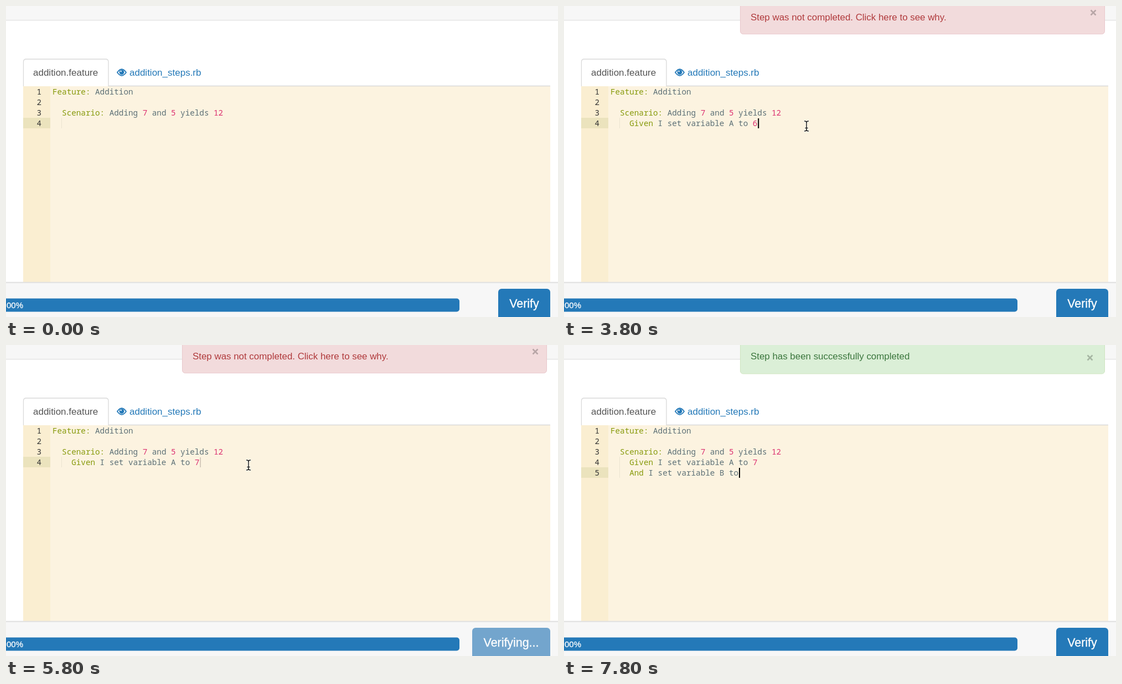
Animation, 997 px wide and 562 px high, one loop 8000 ms. Source, as an HTML page:

```html
<!DOCTYPE html>
<html lang="en">
<head>
<meta charset="utf-8">
<title>Feature editor</title>
<style>
  html, body { margin: 0; width: 100%; height: 100%; overflow: hidden; background: #fff; }
  svg { display: block; width: 100%; height: 100%; }
  text { font: 17px "Liberation Sans", Arial, sans-serif; white-space: pre; }
  .code text { font: 14.27px "Noto Sans Mono", "DejaVu Sans Mono", monospace; fill: #5c7076; }
  .code .key { fill: #879a0c; }
  .code .num { fill: #dc3070; }
  .code .row { fill: #333; text-anchor: end; }
  .light text { fill: #fff; stroke: #fff; stroke-width: .3px; }
  .light .big { font-size: 21.4px; text-anchor: middle; }
  .alert text { font-size: 16.9px; }
  .alert path { stroke: #000; stroke-opacity: .24; stroke-width: 2.6; }
</style>
</head>
<body>
<svg viewBox="0 0 997 562">
  <rect width="997" height="25" fill="#f7f7f7"/>
  <rect y="25" width="997" height="1.3" fill="#e2e2e2"/>

  <rect x="31" y="145" width="952" height="354" fill="#fcf3e0"/>
  <rect x="31" y="145" width="49" height="354" fill="#faeed1"/>
  <path d="M31.5 145V101q0-5 5-5H180q5 0 5 5V144.5H983" fill="none" stroke="#d9d9d9" stroke-width="1.3"/>
  <text x="49" y="126" fill="#555">addition.feature</text>
  <g fill="#2479b8">
    <path d="M201 120q8-11.5 16 0q-8 11.5-16 0z" fill="#fff" stroke="#2479b8" stroke-width="1.8"/>
    <circle cx="209" cy="119.6" r="4.4"/>
    <circle cx="207.6" cy="118" r="1.2" fill="#fff"/>
    <text x="223" y="126">addition_steps.rb</text>
  </g>

  <g class="code">
    <rect id="active" x="31" width="49" height="19" fill="#ebe3bd"/>
    <rect id="guide" x="100" y="202" width="1" fill="#ece4d1"/>
    <g id="lines"></g>
    <rect id="caret" height="18"/>
  </g>

  <rect y="499" width="997" height="63" fill="#f7f7f7"/>
  <rect y="498.6" width="997" height="2" fill="#e0e0e0"/>
  <g class="light">
    <rect x="-10" y="528.5" width="829" height="24" rx="5" fill="#2479b8"/>
    <text x="1" y="546" style="font-size:15px">00%</text>
    <rect id="button" y="511" height="60" rx="6"/>
    <text id="label" class="big" y="545"></text>
  </g>

  <g id="failed" class="alert">
    <rect x="318.5" y="-12" width="658" height="62.7" rx="5" fill="#f2dbdc" stroke="#e9c8cc"/>
    <text x="337" y="26" fill="#b03a3c">Step was not completed. Click here to see why.</text>
    <path d="M951.5 7.5l9 9m0-9l-9 9"/>
  </g>
  <g id="passed" class="alert">
    <rect x="318.5" y="63.5" width="658" height="62.5" rx="5" fill="#dbefd7" stroke="#cfe5c0"/>
    <text x="337" y="100" fill="#3b763d">Step has been successfully completed</text>
    <path d="M945.5 92.5l9 9m0-9l-9 9"/>
  </g>

  <g id="mouse" fill="none" stroke-linecap="round">
    <path id="beam" d="M-3.5-9Q0-9 0-6.5Q0-9 3.5-9M0-6.5V6.5M-3.5 9Q0 9 0 6.5Q0 9 3.5 9M-2 3.5H2" stroke="#fff" stroke-width="3.2" stroke-opacity=".7"/>
    <use href="#beam" style="display:none"/>
    <path d="M-3.5-9Q0-9 0-6.5Q0-9 3.5-9M0-6.5V6.5M-3.5 9Q0 9 0 6.5Q0 9 3.5 9M-2 3.5H2" stroke="#222" stroke-width="1.5"/>
  </g>
</svg>
<script>
const LOOP = 8000, STEP = 200;
const CHAR = 8.562, LEFT = 84, ROW = 19;
const HEADER = ['Feature: Addition', '', '  Scenario: Adding 7 and 5 yields 12'];
const GIVEN = 'Given I set variable A to ';
const AND = 'And I set variable B to';

// Each row: time, then the values reached at that time.
const GIVEN_TYPING = [[0, 0], [1400, 19], [2000, 27]];
const AND_TYPING = [[6200, 0], [6600, 6], [7800, 23]];
const MOUSE_TRIPS = [
  [[2200, 560, 330], [2600, 900, 530], [2800, 900, 530], [3000, 856, 482], [3600, 438, 217], [4000, 438, 217]],
  [[4600, 438, 217], [5000, 930, 535], [5400, 438, 217], [6000, 438, 217]]
];

const $ = id => document.getElementById(id);
const between = (t, from, to) => t >= from && t < to;
const show = (id, on) => $(id).setAttribute('visibility', on ? 'visible' : 'hidden');
const set = (id, attrs) => {
  for (const name in attrs) $(id).setAttribute(name, attrs[name]);
};

function sample(table, t) {
  const next = table.findIndex(row => row[0] > t);
  if (next === 0) return table[0].slice(1);
  if (next < 0) return table[table.length - 1].slice(1);
  const a = table[next - 1], b = table[next];
  const k = (t - a[0]) / (b[0] - a[0]);
  return a.slice(1).map((v, i) => v + (b[i + 1] - v) * k);
}

const typed = (text, table, t) => text.slice(0, Math.floor(sample(table, t)[0] + .001));

function givenLine(t) {
  if (t < 4200) return typed(GIVEN + '6', GIVEN_TYPING, t);
  return t < 4400 ? GIVEN : GIVEN + '7';
}

const colour = text => text
  .replace(/\d+/g, '<tspan class=num>$&</tspan>')
  .replace(/Feature:|Scenario:|Given|And\b/g, '<tspan class=key>$&</tspan>');

function lineMarkup(line, i) {
  const y = 160 + i * ROW;
  const indent = line.length - line.trimStart().length;
  return `<text class="row" x="64" y="${y}">${i + 1}</text>` +
    `<text x="${LEFT + indent * CHAR}" y="${y}">${colour(line.trimStart())}</text>`;
}

function drawEditor(t, busy) {
  const lines = [...HEADER, '    ' + givenLine(t)];
  if (t >= 6200) lines.push('    ' + typed(AND, AND_TYPING, t));
  const last = lines.length - 1;
  const top = 145 + last * ROW;
  $('lines').innerHTML = lines.map(lineMarkup).join('');
  set('active', { y: top });
  set('guide', { height: (last - 2) * ROW });
  set('caret', {
    x: LEFT + lines[last].length * CHAR + (busy ? 1.2 : .8),
    y: top + 1,
    width: busy ? 1 : 2,
    fill: busy ? '#b3a69c' : '#000'
  });
  show('caret', t > 0);
}

function drawButton(busy) {
  const x = busy ? 842 : 889;
  set('button', { x, width: 983 - x, fill: busy ? '#73a5cd' : '#2479b8' });
  set('label', { x: (x + 983) / 2 });
  $('label').textContent = busy ? 'Verifying...' : 'Verify';
}

function drawMouse(t) {
  const trip = MOUSE_TRIPS.find(rows => between(t, rows[0][0], rows[rows.length - 1][0]));
  const [x, y] = trip ? sample(trip, t) : [0, 562];
  set('mouse', { transform: `translate(${x} ${y})` });
  show('mouse', y < 495);
}

function draw(t) {
  const busy = between(t, 2800, 3800) || between(t, 5000, 6000);
  drawEditor(t, busy);
  drawButton(busy);
  drawMouse(t);
  show('failed', between(t, 3800, 7000));
  show('passed', t >= 6000);
  set('passed', { transform: `translate(0 ${t < 7000 ? 0 : -74})` });
}

let shown = -1;
function tick() {
  const t = Math.floor(performance.now() % LOOP / STEP) * STEP;
  if (t !== shown) draw(shown = t);
  requestAnimationFrame(tick);
}
tick();
</script>
</body>
</html>
```
